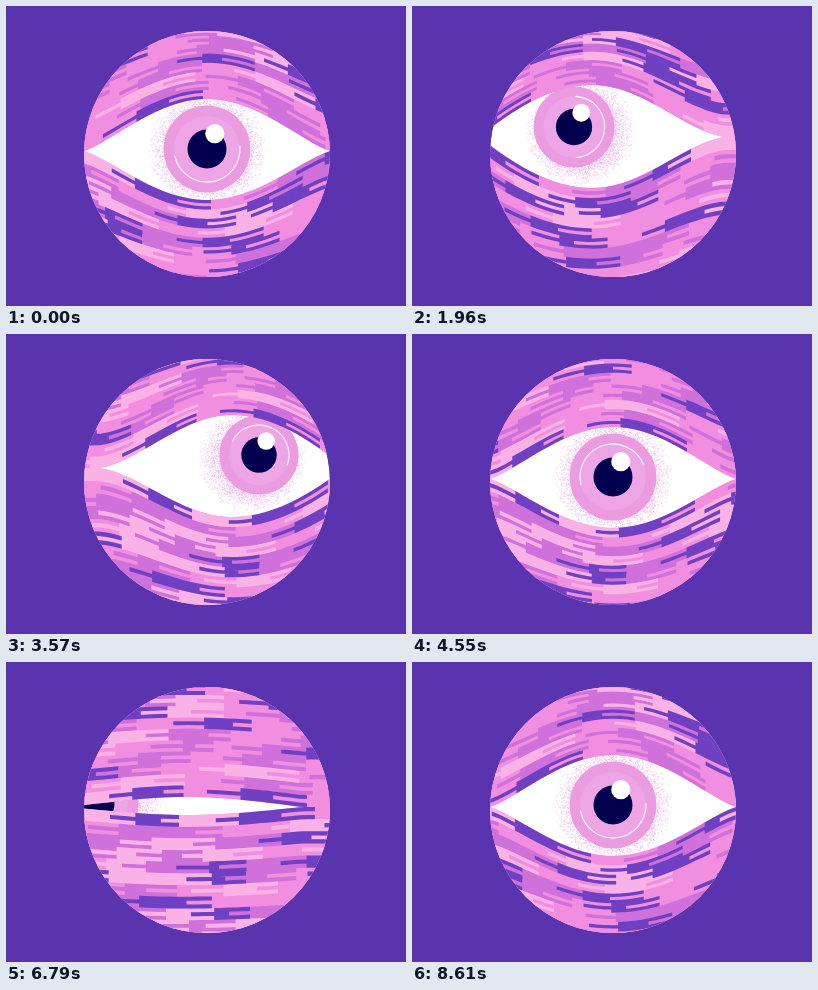
Write an HTML page that moves like this. It is 400 px wide and 300 px high and loops after 8680 ms.

```html
<!DOCTYPE html>
<html lang="en">
<head>
<meta charset="utf-8">
<title>Watching eye</title>
<style>
html, body { margin: 0; width: 100%; height: 100%; overflow: hidden; background: #5a33ae; }
svg { display: block; width: 100vw; height: 100vh; }
</style>
</head>
<body>
<svg viewBox="0 0 400 300">
  <defs><clipPath id="ball"><circle cx="201" cy="148" r="123"/></clipPath></defs>
  <rect width="400" height="300" fill="#5a33ae"/>
  <g clip-path="url(#ball)">
    <circle cx="201" cy="148" r="123" fill="#fff"/>
    <path id="shade" fill="#ebbdea"/>
    <g id="iris">
      <circle r="43.5" fill="#eb9bdf"/>
      <circle r="33" fill="#eda5e6"/>
      <path id="glint" fill="none" stroke="#fff" stroke-width="1.1" stroke-linecap="round"/>
      <circle r="19.5" fill="#03004f"/>
      <circle cx="7.8" cy="-15.3" r="9.6" fill="#fff"/>
    </g>
    <path id="lids" fill="#f18edf"/>
    <g id="bands"></g>
  </g>
</svg>
<script>
const LOOP = 8680, STEP = 70, PERIOD = 403, LAPS = 8;
const LEFT = 78, RIGHT = 324, MID = 147;
const LANE = 4, ROWS = 12;
const COLORS = ['#f18edf', '#cf70db', '#f8b2e5', '#7040c3'];
const $ = id => document.getElementById(id);

let seed = 41;
const rand = () => (seed = (seed * 16807) % 2147483647) / 2147483647;
const pick = () => {
  const r = rand();
  return r < .29 ? 0 : r < .53 ? 1 : r < .77 ? 2 : 3;
};
const mix = (a, b, k) => a + (b - a) * k;
const clamp = (v, lo, hi) => Math.max(lo, Math.min(hi, v));
const ease = k => k * k * (3 - 2 * k);

// Pose: iris x, iris y, scale, lid apex x, upper lid, lower lid, corner y
const CENTER = [201, 143, 1, 201, 93, 194, 145];
const UP_LEFT = [162, 121, .93, 180, 79, 182, 131];
const UP_RIGHT = [253, 121, .91, 226, 81, 183, 134];
const WIDE = [201, 142, 1.34, 201, 63, 225, 145];
const SHUT_LEFT = [89, 142, 1, 180, 135, 153, 145];
const GONE_LEFT = [20, 142, 1, 180, 143, 147, 145];
const GONE_RIGHT = [382, 142, 1, 222, 142, 148, 145];
const KEYS = [
  [0, CENTER], [910, CENTER], [1400, UP_LEFT], [2240, UP_LEFT],
  [2800, UP_RIGHT], [3710, UP_RIGHT], [4270, CENTER], [4760, CENTER],
  [5320, WIDE], [6230, WIDE], [6790, SHUT_LEFT], [6929, GONE_LEFT],
  [6930, GONE_RIGHT], [7560, CENTER], [LOOP, CENTER]
];

function poseAt(t) {
  const i = KEYS.findIndex((key, n) => n && t < key[0]);
  const [t0, a] = KEYS[i - 1], [t1, b] = KEYS[i];
  const k = ease((t - t0) / (t1 - t0));
  return a.map((v, n) => mix(v, b[n], k));
}

// Blocks of colour along each row, repeating every PERIOD
function makeRow() {
  const blocks = [];
  let x = 0, last = -1;
  while (x < PERIOD) {
    let color = pick();
    if (color === last) color = (color + 1) % 4;
    let end = x + 36 + rand() * 36;
    if (end > PERIOD - 30) end = PERIOD;
    blocks.push({ x, end, color, fork: 9 + rand() * 8 });
    last = color;
    x = end;
  }
  const offset = rand() * PERIOD;
  blocks.forEach((b, i) => {
    b.before = blocks[(i + blocks.length - 1) % blocks.length].fork;
    b.x += offset;
    b.end += offset;
  });
  return blocks;
}
const rows = [-1, 1].map(() => Array.from({ length: ROWS }, makeRow));

const bandPaths = COLORS.map(fill => {
  const path = document.createElementNS('http://www.w3.org/2000/svg', 'path');
  path.setAttribute('fill', fill);
  $('bands').append(path);
  return path;
});

function speckle(count, size, radius) {
  let d = '';
  for (let i = 0; i < count; i++) {
    const a = rand() * Math.PI * 2, r = radius();
    d += `M${(r * Math.cos(a)).toFixed(1)} ${(r * Math.sin(a)).toFixed(1)}h${size}v${size}h-${size}z`;
  }
  return d;
}
$('shade').setAttribute('d', speckle(4200, .8, () => 34 + 25 * rand() * Math.sqrt(rand())));

function lidShape(x, apex, shift) {
  const inner = x < apex;
  const half = inner ? apex - LEFT - shift : RIGHT + shift - apex;
  const v = clamp((inner ? x - LEFT - shift : RIGHT + shift - x) / half, 0, 1);
  return Math.sin(v * Math.PI / 2) ** (1.22 * (half / 123) ** 3);
}

// Height of the line at distance d from the lid edge
function lineY(x, d, side, pose) {
  const [gaze, , , apex, top, bottom, corner] = pose;
  const shift = clamp((gaze - 201) / 4, -28, 28);
  const edge = mix(corner, side < 0 ? top : bottom, lidShape(x, apex, shift));
  return MID + (edge - MID) * (1 - d / 220) + side * d;
}

function strip(x0, x1, d0, d1, side, pose) {
  const a = Math.max(70, x0), b = Math.min(332, x1);
  if (b <= a) return '';
  const n = Math.ceil((b - a) / 8), near = [], far = [];
  for (let i = 0; i <= n; i++) {
    const x = mix(a, b, i / n), p = x.toFixed(1) + ' ';
    near.push(p + lineY(x, d0, side, pose).toFixed(1));
    far.unshift(p + lineY(x, d1, side, pose).toFixed(1));
  }
  return 'M' + near.concat(far).join('L') + 'z';
}

function drawBands(shift, pose) {
  const d = COLORS.map(() => '');
  rows.forEach((half, h) => half.forEach((blocks, row) => {
    const side = h ? 1 : -1;
    for (const b of blocks) {
      let x = (b.x + shift) % PERIOD;
      if (x > 350) x -= PERIOD;
      const end = x + b.end - b.x;
      for (let lane = 0; lane < 3; lane++) {
        const dir = lane === 1 ? -1 : 1;
        const near = (row * 3 + lane) * LANE;
        d[b.color] += strip(x + dir * b.before, end + dir * b.fork,
          near, near + LANE + .15, side, pose);
      }
    }
  }));
  bandPaths.forEach((path, i) => path.setAttribute('d', d[i]));
}

function draw(t) {
  const pose = poseAt(t), [x, y, s] = pose;
  const nx = clamp((201 - x) * .16, -7, 7), ny = (142 - y) * .2;
  $('shade').setAttribute('transform', `translate(${x + nx} ${y + ny}) scale(${s})`);
  $('iris').setAttribute('transform', `translate(${x} ${y}) scale(${s})`);

  const start = -5 - 360 * t / LOOP;
  const at = deg => {
    const a = deg * Math.PI / 180;
    return `${33 * Math.cos(a)} ${33 * Math.sin(a)}`;
  };
  $('glint').setAttribute('d', `M${at(start)}A33 33 0 0 1 ${at(start + 172)}`);

  $('lids').setAttribute('d', strip(70, 332, 0, 145, -1, pose) + strip(70, 332, 0, 145, 1, pose));
  drawBands(t / LOOP * LAPS * PERIOD, pose);
}

const origin = performance.now();
let shown = -1;
function tick() {
  const t = Math.floor(((performance.now() - origin) % LOOP) / STEP) * STEP;
  if (t !== shown) draw(shown = t);
  requestAnimationFrame(tick);
}
tick();
</script>
</body>
</html>
```
